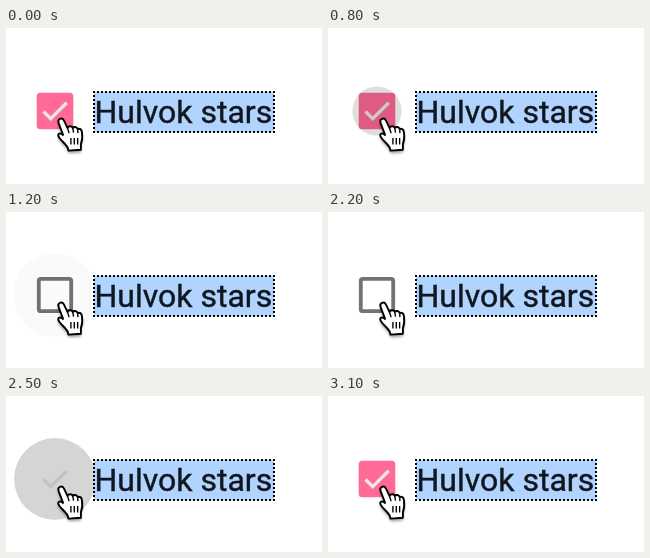
Write an HTML page that moves like this. It is 316 by 156 pixels and loops after 3.3 s.

```html
<!DOCTYPE html>
<html lang="en">
<head>
<meta charset="utf-8">
<title>Checkbox ripple</title>
<style>
  html, body { margin: 0; width: 100%; height: 100%; overflow: hidden; background: #fff; }
  svg { display: block; width: 100vw; height: 100vh; }
  text { font: 32px Roboto, sans-serif; fill: #11161f; stroke: #11161f; stroke-width: .4px; }
</style>
</head>
<body>
<svg viewBox="0 0 316 156">
  <defs>
    <filter id="soft" x="-30%" y="-30%" width="160%" height="160%">
      <feGaussianBlur stdDeviation="1.3"/>
    </filter>
    <path id="hand" d="M.7 3.5C-.6 0 4 -2 5.8 1.3L9.2 8.2C10.3 6 13.4 6.2 14.2 8.2C15.6 6.6 18.3 7.2 18.9 9.2C20.7 8.2 22.7 9.6 23 12C23.7 16.5 23.4 19.5 22 23V28.3L10.2 29L9.3 26C6.6 22 3.6 20.3 1.4 17.2C-1 13.8 1.6 11.8 5 14.6Z"/>
  </defs>
  <rect id="frame" x="32.8" y="66.8" width="32.4" height="32.4" rx="2" fill="none" stroke="#737373" stroke-width="3.8"/>
  <rect id="fill" x="30.7" y="64.7" width="36.6" height="36.6" rx="3.5" fill="#ff6a96"/>
  <path id="tick" d="M37.5 83.5L44.7 90.6L60.7 74.8" fill="none" stroke="#eee6e9" stroke-width="3.4"/>
  <circle id="ripple" cx="49" cy="83"/>
  <rect x="88" y="64" width="180" height="40" fill="#b0d4fd"/>
  <rect x="88" y="64" width="180" height="40" fill="none" stroke="#000" stroke-width="2" stroke-dasharray="2" stroke-dashoffset="1"/>
  <text x="88.5" y="94.5">Hulvok stars</text>
  <g transform="translate(51.8 91) scale(1.05 1.09)">
    <use href="#hand" y="2.5" opacity=".4" filter="url(#soft)"/>
    <use href="#hand" fill="#fff" stroke="#000" stroke-width="1.8" stroke-linejoin="round"/>
    <path d="M9.2 8.2L10.8 13M14.2 8.2L15 12.5M18.9 9.2L19.2 13M12.5 17.5v6m3.2 -6v6m3.2 -6v6" fill="none" stroke="#000" stroke-width="1.3"/>
  </g>
</svg>
<script>
  const LOOP = 3300, STEP = 100, UNCHECK = 600, CHECK = 2200;
  const PEAK = .165, RESIDUE = .018;

  const ramp = (t, from, to) => Math.min(1, Math.max(0, (t - from) / (to - from)));

  function set(id, attrs) {
    const el = document.getElementById(id);
    for (const name in attrs) el.setAttribute(name, attrs[name]);
  }

  function draw(now) {
    const t = Math.floor(now % LOOP / STEP) * STEP;
    const checking = t >= CHECK;
    const age = t - (checking ? CHECK : UNCHECK);

    // The ripple grows and darkens while pressed, then fades on release.
    const press = ramp(age, 0, 300) ** .6;
    const release = ramp(age, 300, 500);
    const shade = PEAK * press * (1 - release) ** 2;
    const floor = checking ? 0 : RESIDUE * release;
    const speed = checking ? .123 : .103;
    set('ripple', {
      r: age < 0 ? 0 : Math.min(42, 4 + speed * age),
      opacity: Math.max(shade, floor)
    });

    // When checking, the outline gives way to the tick before the fill arrives.
    const pink = checking ? release : 1 - release;
    const mark = checking ? ramp(age, 100, 300) : pink;
    set('fill', { opacity: pink });
    set('tick', { opacity: mark });
    set('frame', { opacity: 1 - mark });
  }

  const start = performance.now();
  function run() {
    draw(performance.now() - start);
    requestAnimationFrame(run);
  }
  run();
</script>
</body>
</html>
```
